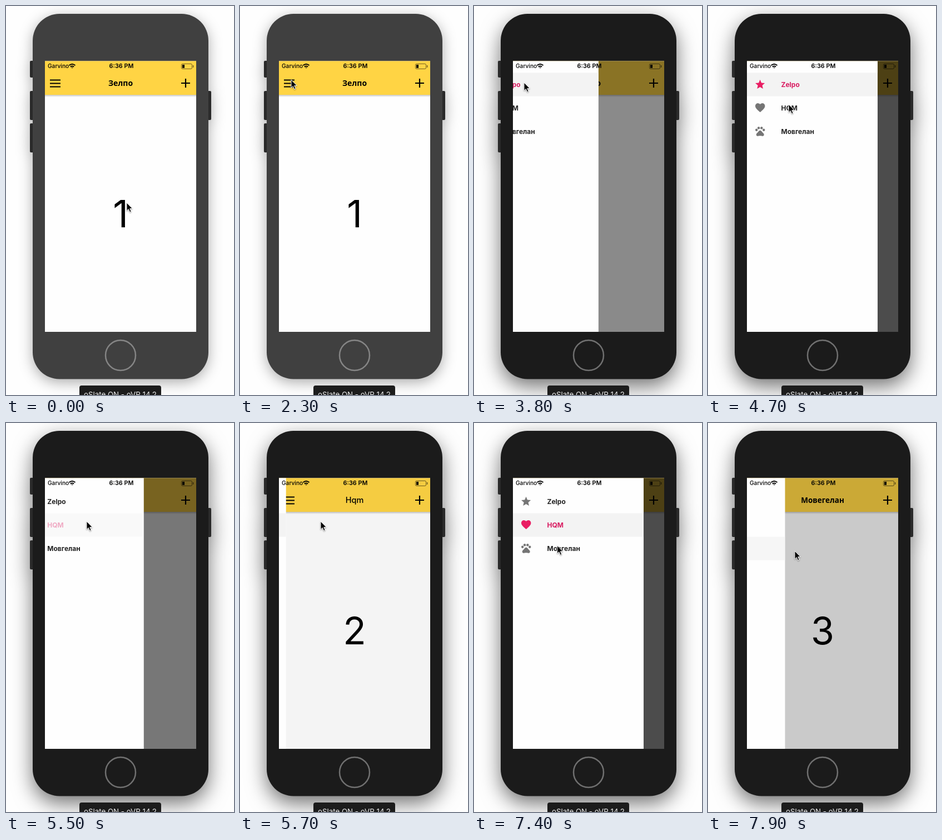
Write an HTML page that moves like this. It is 410 px wide and 696 px high and loops after 8000 ms.

```html
<!DOCTYPE html>
<html lang="ru">
<head>
<meta charset="utf-8">
<title>Drawer navigation</title>
<style>
html, body { margin: 0; width: 100%; height: 100%; overflow: hidden; background: #fefefe; }
svg { display: block; font-family: Inter, sans-serif; }
#phone { --body: #404040; --ring: #858585; filter: drop-shadow(0 6px 12px rgba(0,0,0,.32)); }
#phone.focused { --body: #1b1b1b; --ring: #707070; filter: drop-shadow(0 13px 18px rgba(0,0,0,.55)); }
#case { fill: var(--body); }
#home { fill: none; stroke: var(--ring); stroke-width: 2.5; }
.label { font-size: 12px; font-weight: 700; fill: #222; }
.icon { fill: #757575; }
.band { fill: none; }
.active .label { fill: #d81b60; }
.active .icon { fill: #e91e63; }
.active .band { fill: #f3f3f3; }
.middle { text-anchor: middle; }
</style>
</head>
<body>
<svg width="410" height="696" viewBox="0 0 410 696">
  <defs>
    <clipPath id="screen"><rect x="70" y="98.5" width="272" height="484.5"/></clipPath>
    <linearGradient id="fade" x2="0" y2="1">
      <stop stop-opacity=".22"/><stop offset="1" stop-opacity="0"/>
    </linearGradient>
  </defs>

  <g id="phone">
    <g fill="#2a2a2a">
      <rect x="43" y="98" width="9" height="30" rx="2"/>
      <rect x="43" y="152" width="9" height="52" rx="2"/>
      <rect x="43" y="210" width="9" height="52" rx="2"/>
      <rect x="360" y="152" width="9" height="52" rx="2"/>
    </g>
    <rect id="case" x="48" y="14" width="316" height="653.5" rx="48"/>
    <circle id="home" cx="206" cy="625" r="27"/>
  </g>

  <g clip-path="url(#screen)">
    <rect x="70" y="98" width="272" height="485" fill="#fefefe"/>
    <rect x="70" y="159" width="272" height="4" fill="url(#fade)"/>
    <rect x="70" y="98" width="272" height="61" fill="#ffd444"/>
    <path d="M79 132.5h19M79 138.5h19M79 144.5h19M315 138h16M323 130v16" stroke="#000" stroke-width="2.2"/>
    <text id="title" class="middle" x="206" y="143"/>
    <text id="number" class="middle" x="206" y="396" font-size="68"/>
    <rect id="shade" x="70" y="98" width="272" height="485"/>
    <g id="drawer">
      <rect x="70" y="98" width="235" height="485" fill="#fefefe"/>
      <g class="row">
        <rect class="band" x="70" y="119.5" width="235" height="42"/>
        <path class="icon" transform="translate(83.3 130) scale(.86)" d="M12 17.3 18.2 21l-1.6-7L22 9.2l-7.2-.6L12 2 9.2 8.6 2 9.2 7.5 14 5.8 21z"/>
        <text class="label" x="131.5" y="145">Zelpo</text>
      </g>
      <g class="row">
        <rect class="band" x="70" y="161.5" width="235" height="42"/>
        <path class="icon" transform="translate(83.3 171.5) scale(.87)" d="M12 21.4 10.5 20C5.4 15.4 2 12.3 2 8.5 2 5.4 4.4 3 7.5 3 9.2 3 10.9 3.8 12 5.1 13.1 3.8 14.8 3 16.5 3 19.6 3 22 5.4 22 8.5c0 3.8-3.4 6.9-8.5 11.5z"/>
        <text class="label" x="131.5" y="186.5">HQM</text>
      </g>
      <g class="row">
        <rect class="band" x="70" y="203.5" width="235" height="42"/>
        <g class="icon" transform="translate(83.3 213.5) scale(.87)">
          <circle cx="4.5" cy="9.5" r="2.5"/><circle cx="9" cy="5.5" r="2.5"/>
          <circle cx="15" cy="5.5" r="2.5"/><circle cx="19.5" cy="9.5" r="2.5"/>
          <path d="M12 10.5c1.3 0 2 .5 2.9 1.5l2.4 2.9c1.4 1.3 3 2.7 2.7 4.8-.3 1-1 2-2.4 2.3-.8.1-3-.5-5.6-.5s-4.800.6-5.600.5C5 21.700 4.300 20.700 4 19.700c-.3-2.100 1.300-3.500 2.700-4.800L9.100 12c.9-1 1.600-1.500 2.900-1.500z"/>
        </g>
        <text class="label" x="131.5" y="228.500">Мовгелан</text>
      </g>
    </g>
    <g font-size="10.800">
      <text x="75" y="111.300" font-size="10.200" font-weight="500">Garvino</text>
      <text class="middle" x="207.500" y="111.300" font-weight="600">6:36 PM</text>
      <g fill="none" stroke="#000" stroke-width="2">
        <path d="M113.500 106.300q5.500-4.500 11 0M115.800 108.800q3.200-2.600 6.400 0"/>
        <path d="M117.200 109.700h3.600l-1.800 1.900z" fill="#000" stroke="none"/>
        <rect x="315.500" y="103.500" width="19" height="9" rx="2" stroke-width="1" stroke-opacity=".55"/>
      </g>
      <rect x="317" y="105" width="4" height="6"/>
      <rect x="336" y="106" width="1.300" height="4" fill-opacity=".6"/>
    </g>
  </g>

  <rect x="132" y="679" width="147" height="30" rx="4" fill="#1c1c1c"/>
  <text class="middle" x="205.500" y="699.500" font-size="13.300" fill="#eee">oSlate QN - oVR 14.2</text>
  <path id="cursor" d="M0 0V14.500L3.300 11.400 5.800 17 8.200 16 5.800 10.500H10.300Z" stroke="#fff" stroke-width="1" style="filter:drop-shadow(0 1px 1px rgba(0,0,0,.4))"/>
</svg>
<script>
const LOOP = 8000, FOCUS = 3600, DRAWER_WIDTH = 235;
const $ = id => document.getElementById(id);
const rows = document.querySelectorAll('.row');

// Drawer switches between closed and open at each of these times.
const toggles = [3680, 5450, 6667, 7767];
const pages = [
  { from: 0, title: 'Зелпо', font: '600 14px "Noto Sans", sans-serif' },
  { from: toggles[1], title: 'Hqm', font: '500 14.5px Inter, sans-serif' },
  { from: toggles[3], title: 'Мовегелан', font: '600 13.5px "Noto Sans", sans-serif' }
];

// Pointer stops: time, x, y
const stops = [
  [0, 217, 352], [1650, 217, 352], [2300, 92, 132], [2500, 92, 132],
  [2800, 89, 138], [3100, 89, 138], [3200, 90, 137], [4350, 90, 137],
  [4700, 145, 176], [5850, 145, 176], [6200, 104, 138], [6500, 93, 133],
  [7000, 93, 133], [7500, 156, 229], [LOOP, 156, 229]
];

// Critically damped spring, 0 to 1
function spring(ms) {
  const x = ms * .0185;
  return 1 - (1 + x) * Math.exp(-x);
}

function drawerOpen(t) {
  const i = toggles.findLastIndex(start => start <= t);
  if (i < 0) return 0;
  const s = spring(t - toggles[i]);
  return i % 2 ? 1 - s : s;
}

function pointer(t) {
  const i = stops.findIndex(stop => stop[0] > t);
  const [t0, x0, y0] = stops[i - 1], [t1, x1, y1] = stops[i];
  const k = (t - t0) / (t1 - t0), e = k * k * (3 - 2 * k);
  return [x0 + (x1 - x0) * e, y0 + (y1 - y0) * e];
}

// A tapped row dims, then fades back after release.
function rowOpacity(sinceRelease) {
  if (sinceRelease < -50) return 1;
  return .2 + .8 * Math.min(1, Math.max(0, sinceRelease / 250));
}

function draw(t) {
  const open = drawerOpen(t);
  const current = pages.findLastIndex(page => page.from <= t);
  $('phone').classList.toggle('focused', t >= FOCUS);
  $('title').textContent = pages[current].title;
  $('title').style.font = pages[current].font;
  $('number').textContent = current + 1;
  $('shade').setAttribute('opacity', .7 * open);
  $('drawer').setAttribute('transform', `translate(${(open - 1) * DRAWER_WIDTH})`);
  $('cursor').setAttribute('transform', `translate(${pointer(t)})`);
  rows.forEach((row, i) => {
    row.classList.toggle('active', i === current);
    row.setAttribute('opacity', i ? rowOpacity(t - pages[i].from) : 1);
  });
}

const begin = performance.now();
function tick() {
  draw((performance.now() - begin) % LOOP);
  requestAnimationFrame(tick);
}
tick();
</script>
</body>
</html>
```
